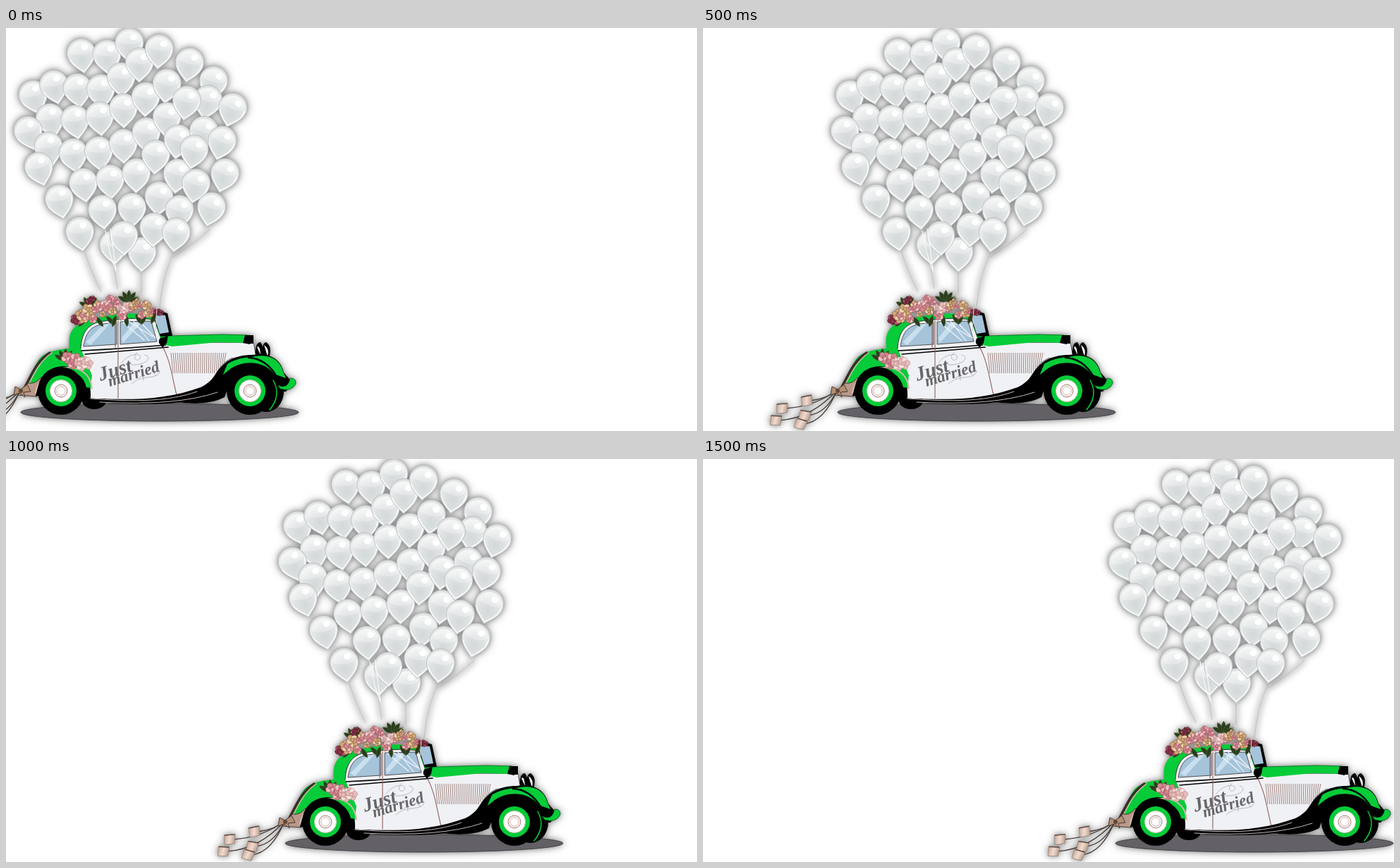
These frames come from a looping animation (980x572 px, 2 s). An HTML page:

```html
<!DOCTYPE html>
<html lang="en">
<head>
<meta charset="utf-8">
<title>Wedding car</title>
<style>
  html, body { margin: 0; width: 100%; height: 100%; overflow: hidden; background: #fff; }
  svg { display: block; }
  .glow { filter: drop-shadow(0 0 3px rgba(0, 0, 0, .2)) drop-shadow(0 0 6px rgba(0, 0, 0, .42)); }
  .haze { fill: none; stroke: #000; stroke-width: 9; opacity: .2; filter: blur(4px); }
  .green { fill: #05cc38; }
  .body { fill: #f0f1f5; }
  .glass { fill: #a5c4da; }
  .line { fill: none; stroke-linecap: round; }
  text { font: italic bold 28px "Liberation Serif", "Noto Serif", serif; fill: #66666a; }
  text.small { font-size: 23px; }
</style>
</head>
<body>
<svg width="980" height="572" viewBox="0 0 980 572">
  <defs>
    <radialGradient id="skin" cx=".5" cy=".62" r=".62">
      <stop offset="0" stop-color="#d3d8d9"/>
      <stop offset=".55" stop-color="#dfe3e4"/>
      <stop offset=".85" stop-color="#eceeee"/>
      <stop offset="1" stop-color="#d4d6d7"/>
    </radialGradient>
    <linearGradient id="gloss" x2="0" y2="1">
      <stop offset="0" stop-color="#fff" stop-opacity=".55"/>
      <stop offset="1" stop-color="#fff" stop-opacity=".25"/>
    </linearGradient>
    <linearGradient id="tin">
      <stop offset="0" stop-color="#c9a898"/>
      <stop offset=".5" stop-color="#f0dccf"/>
      <stop offset="1" stop-color="#b99d8e"/>
    </linearGradient>
    <g id="balloon">
      <path d="M0 27C-6 20-20 12-20-3A20 20 0 0 1 20-3C20 12 6 20 0 27Z" fill="url(#skin)" stroke="#b9bcbe" stroke-width=".8"/>
      <path class="line" d="M-17 5C-13 14-6 19 0 24C7 18 17 11 18-2" stroke="#fff" stroke-width="1.3"/>
      <path d="M-16-4C-16-23 15-24 16-5C8 4-7 0-16-4Z" fill="url(#gloss)"/>
      <ellipse cx="6" cy="-10" rx="5" ry="4.5" fill="#fff" opacity=".9"/>
    </g>
    <g id="wheel">
      <ellipse rx="33" ry="34"/>
      <circle r="22" class="green"/>
      <circle r="15.5" fill="#fff" stroke="#d9c6c0"/>
      <circle r="9" fill="#f3eeee" stroke="#a98078"/>
      <circle r="6" fill="#fff" stroke="#d6bdb6"/>
    </g>
    <g id="can">
      <path d="M-8-5L7-8L8 5L-6 8Z" fill="url(#tin)" stroke="#8d7568" stroke-width=".6"/>
      <path d="M-8-5L7-8" stroke="#5c4a42" stroke-width="1.4"/>
    </g>
    <path id="leaf" d="M0 0C-4-5-4-12 0-17C4-12 4-5 0 0Z" fill="#293c1c" stroke="#617044" stroke-width=".5"/>
    <path id="ropes" d="M112 319Q122 350 135 374M153 337L158 370M192 348V376M238 318Q222 352 218 395M289 286Q262 310 237 325"/>
  </defs>

  <g id="scene">
    <use href="#ropes" class="haze"/>
    <use href="#ropes" class="line" stroke="#c2c2c4"/>
    <g class="glow" id="balloons"></g>
    <path class="line" stroke="#f8f8f8" stroke-width="1.3" d="M141 288Q146 320 156 345M148 285Q152 310 156 345"/>

    <g class="glow">
      <ellipse cx="218" cy="545.5" rx="197" ry="12.5" fill="#636165" stroke="#414044"/>
      <g class="line" stroke="#49403c" stroke-width="1.4" id="strings"></g>
      <g id="cans"></g>
      <ellipse cx="125" cy="529" rx="17" ry="12"/>
      <ellipse cx="369" cy="516" rx="25" ry="29"/>

      <!-- Rear and cabin -->
      <path d="M22 521C32 504 37 484 47 470C56 459 75 456 90 455C88 435 92 425 108 418C137 406 180 403 219 406L241 447L239 480L123 525L40 522Z" class="green"/>
      <path class="line" d="M26 511C36 494 42 474 62 461" stroke="#3b2c28" stroke-width="3.5"/>
      <path class="line" d="M29 511C39 494 46 474 65 461" stroke="#d5b8ac" stroke-width="1.5"/>
      <path d="M17 521L31 504Q42 506 49 496L53 499L43 523Z" fill="#b9998b" stroke="#33231f" stroke-width=".8"/>
      <path class="body" d="M106 455C107 434 115 421 133 417C161 412 188 411 210 414L221 447H345L354 466L320 468C302 476 296 496 283 510L242 527L118 526L122 493Z"/>
      <path class="line" d="M106 455C107 434 115 421 133 417C161 412 188 411 210 414" stroke="#222" stroke-width=".9"/>
      <path d="M217 448C224 436 238 437 267 436L306 435L348 436L340 447L300 446L236 452Z" class="green"/>
      <path class="line" d="M235 437L306 435L342 436" stroke="#067a25"/>
      <path class="glass" stroke="#332c2c" stroke-width=".8" d="M110 452C113 431 121 423 138 420L157 418V449ZM162 449V417L206 416L214 445Z"/>
      <path fill="#c9dfed" d="M113 446L138 421L148 419L120 450ZM164 440L181 418H192L166 447Z"/>
      <path class="line" d="M166 418L196 443M173 416L208 438M181 416L203 444M192 419L212 440" stroke="#f5f5fa" stroke-width="1.2"/>
      <path d="M207 405Q220 401 229 405L236 437L219 438Z"/>
      <path class="glass" d="M210 409Q219 406 226 408L231 432L218 434Z"/>
      <path d="M217 447Q216 438 224 439L230 436L228 447L222 454Z"/>
      <path class="line" d="M107 458Q168 455 226 450M112 463Q168 458 230 453" stroke="#000" stroke-width="1.7"/>
      <path class="line" d="M159 415V525M155 416V453M223 454C234 475 236 498 243 525" stroke="#8d5f5a" stroke-width="1.1"/>
      <g id="vents" stroke="#a28782"></g>

      <!-- Grille, lamps, wings and bumper -->
      <path d="M336 447L339 436H351V447L355 465H346V449Z"/>
      <path d="M346 448H351L354 465H346Z" class="body"/>
      <path d="M354 464Q353 446 361 446Q366 452 363 466ZM364 466Q362 447 369 446Q378 452 373 468Z"/>
      <path d="M356 453Q360 449 361 464ZM366 450Q374 455 371 466Z" fill="#fff"/>
      <path d="M236 530C272 524 283 514 297 492C308 472 328 464 348 464C374 460 390 470 394 489L407 504L397 516H375C371 497 359 488 345 488C325 488 318 501 310 524C287 536 255 533 236 530Z"/>
      <path d="M293 505C302 476 327 468 349 467C373 461 389 471 393 488L397 497L380 491C368 473 337 470 318 484Q306 493 293 505Z" class="green"/>
      <path class="line" d="M344 468Q369 469 384 495" stroke="#000" stroke-width="2.5"/>
      <path d="M385 507Q400 514 403 497Q412 497 411 505Q405 517 389 512Z" class="green" stroke="#044719" stroke-width=".7"/>
      <path d="M107 524C170 531 230 527 276 510C296 501 301 483 315 475C300 507 304 519 272 528C211 538 149 533 107 530Z"/>
      <path class="line" d="M120 526C184 531 232 530 271 516M133 531Q241 537 300 517" stroke="#f3e9e8" stroke-width=".8"/>
      <path d="M42 523C46 495 57 482 80 480C107 479 122 499 120 525H106C110 496 95 487 77 488C58 488 51 501 51 521Z"/>
      <path d="M57 490C76 473 123 479 122 511L114 510C108 484 80 481 57 490Z" class="green"/>
      <path class="line" d="M42 518C48 478 118 465 122 512" stroke="#d8bcb1" stroke-width="2"/>
      <use href="#wheel" x="78" y="515"/>
      <use href="#wheel" x="346" y="515"/>
      <path class="line" d="M374 542Q391 521 379 500" stroke="#05cc38" stroke-width="1.5"/>

      <text transform="translate(134 501) rotate(-17)">Just</text>
      <text transform="translate(147 509) rotate(-17)" class="small">married</text>
      <path class="line" stroke="#a9a9ad" stroke-width=".8" d="M164 475C177 459 194 462 190 469C185 476 178 466 186 461M177 478C201 479 208 466 197 464M178 505C194 490 215 501 218 487C216 481 205 492 213 493M188 497Q196 490 195 500"/>
      <path d="M13 509L21 513L30 506L35 516L25 517L27 524L19 518L11 521Z" fill="#b18f77" stroke="#4d392c"/>
      <circle cx="21" cy="515" r="3" fill="#604736"/>
      <g id="flowers"></g>
      <path class="line" stroke="#d6cfc7" d="M184 378Q194 369 191 383M185 384Q198 377 193 388M214 397L212 431"/>
    </g>
  </g>
</svg>
<script>
const put = (id, html) => document.getElementById(id).innerHTML = html;
const repeat = (n, make) => Array.from({ length: n }, (_, i) => make(i)).join('');
const place = (id, x, y, turn) =>
  `<use href="#${id}" transform="translate(${x} ${y}) rotate(${turn})"/>`;

let seed = 7;
const random = () => (seed = seed * 16807 % 2147483647) / 2147483647;
const between = (a, b) => a + (b - a) * random();
const pick = list => list[Math.floor(random() * list.length)];

// Balloons sit evenly along curved strands and lean towards the car.
function strand([count, d]) {
  const path = document.createElementNS('http://www.w3.org/2000/svg', 'path');
  path.setAttribute('d', d);
  const gap = path.getTotalLength() / (count - 1);
  return repeat(count, i => {
    const { x, y } = path.getPointAtLength(i * gap);
    return place('balloon', x, y, (x - 180) * .12);
  });
}
put('balloons', [
  [3, 'M107 38Q150 48 175 23'],
  [2, 'M260 51L294 77'],
  [7, 'M39 97C75 58 115 115 160 75S205 45 217 32'],
  [2, 'M286 104L321 115'],
  [6, 'M63 130C110 138 160 128 228 81'],
  [8, 'M32 148C75 195 130 180 165 167S220 135 256 105'],
  [3, 'M47 199L105 291'],
  [6, 'M110 222C145 212 175 225 200 195S250 155 280 148'],
  [6, 'M137 260C195 262 225 245 245 205S275 170 306 162'],
  [2, 'M153 310L193 320'],
  [5, 'M167 297C220 287 245 270 258 240S290 213 310 208'],
  [2, 'M241 292L291 256']
].map(strand).join(''));

const cans = [[-23, 529], [-58, 540], [-67, 557], [-26, 550], [-32, 562]];
put('strings', cans.map(([x, y]) => `<path d="M20 514Q${x / 2 + 18} ${y - 3} ${x + 5} ${y}"/>`).join(''));
put('cans', cans.map(([x, y], i) => place('can', x, y, i * 7)).join(''));

put('vents', repeat(27, i =>
  `<path d="M${234 + i * 3} 461l${3 - i * .22} ${29 - Math.max(0, i - 21) * 3}"/>`));

const tones = {
  pink: ['#d08a90', '#efc0c1', '#a24f5e'],
  cream: ['#d2a878', '#ecd3a8', '#8b5f45'],
  wine: ['#8c3246', '#b95c6c', '#4a1a26'],
  blush: ['#e6bdbb', '#f6e2de', '#bb8384']
};
function flower(x, y, r, tone) {
  const [base, light, dark] = tones[tone];
  const petals = repeat(5, i => `<ellipse cy="${-r * .5}" rx="${r * .45}" ry="${r * .5}"
    fill="${i % 2 ? light : base}" stroke="${dark}" stroke-width=".6" transform="rotate(${i * 72 + x * 17})"/>`);
  return `<g transform="translate(${x} ${y})">${petals}<circle r="${r * .3}" fill="${base}" stroke="${dark}" stroke-width=".8"/></g>`;
}
const spray = (x, y) => repeat(5, i => place('leaf', x, y, i * 32 - 62));

// Roof flowers fill the space between a domed crest and the roof line.
function roofFlower(i) {
  const t = i / 35;
  const crest = 408 - 4 * t - 25 * Math.sin(Math.PI * t);
  const y = between(crest, 418 - 14 * t);
  const tone = t < .05 || t > .92 ? 'wine' : pick(t < .3 ? ['cream', 'cream', 'pink'] : ['pink', 'pink', 'blush', 'cream']);
  return flower(99 + 121 * t, y, between(5, 9) - 2 * t, tone);
}
put('flowers',
  spray(174, 389) + spray(119, 397) + spray(84, 472) +
  repeat(9, i => place('leaf', 100 + i * 14, 412 - i, between(110, 230))) +
  repeat(36, roofFlower) +
  flower(118, 388, 5, 'wine') + flower(123, 384, 4, 'wine') +
  repeat(8, i => flower(87 + i * 4, 468 + i % 3 * 4 + i * .6, between(6, 9), i < 4 ? 'pink' : 'blush')));

// The car holds each position for half a second.
const stops = [0, 170, 375, 564];
const scene = document.getElementById('scene');
function draw() {
  const step = Math.floor(performance.now() % 2000 / 500);
  scene.setAttribute('transform', `translate(${stops[step]} 0)`);
  requestAnimationFrame(draw);
}
draw();
</script>
</body>
</html>
```
